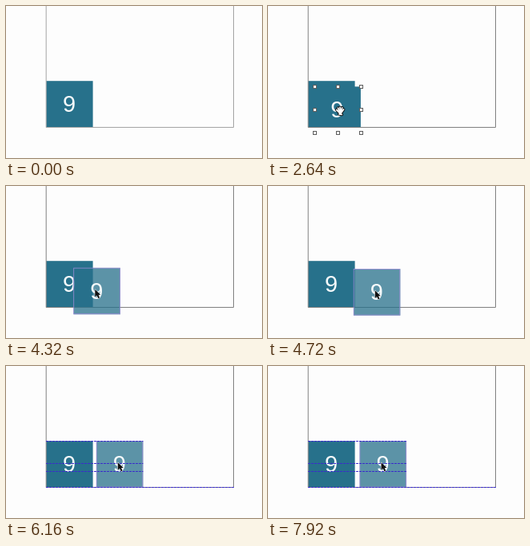
Recreate the animation shown at these times as an HTML page with a canvas. Size 320 by 191 pixels, loop 8 s.

```html
<!DOCTYPE html>
<html lang="en">
<head>
<meta charset="utf-8">
<title>Duplicate and drag</title>
<style>
html, body { margin: 0; width: 100%; height: 100%; overflow: hidden; background: #fdfdfd; }
canvas { display: block; width: 320px; height: 191px; }
</style>
</head>
<body>
<canvas id="stage"></canvas>
<script>
const LOOP = 8000, STEP = 80, SIZE = 58.4, LEFT = 50.2, TOP = 94.2;
const canvas = document.getElementById('stage');
const ctx = canvas.getContext('2d');
const dpr = window.devicePixelRatio || 1;
canvas.width = 320 * dpr;
canvas.height = 191 * dpr;

const ramp = (t, from, to) => Math.min(1, Math.max(0, (t - from) / (to - from)));

function handAt(t) {
  const enter = ramp(t, 400, 720), nudge = ramp(t, 3280, 3440);
  return [101 - 11 * enter - 4.5 * nudge, 172 - 39.5 * enter - nudge];
}

// Pull out, pull back, then small corrections
function copyAt(t) {
  const x = 57.5
    + 49.5 * ramp(t, 3840, 4720)
    + 37 * ramp(t, 4720, 5200)
    - 31 * ramp(t, 5360, 6160)
    - 8 * ramp(t, 6320, 6560)
    + 5 * ramp(t, 6720, 6960)
    + 5 * ramp(t, 7040, 7120)
    - 3.5 * ramp(t, 7200, 7360)
    + 3.2 * ramp(t, 7440, 7920);
  return [x, t < 4880 ? 101.3 + 3 * ramp(t, 3840, 4720) : TOP];
}

function line(color, dash, ...points) {
  ctx.strokeStyle = color;
  ctx.lineWidth = 1;
  ctx.setLineDash(dash);
  ctx.beginPath();
  points.forEach(([x, y]) => ctx.lineTo(x, y));
  ctx.stroke();
  ctx.setLineDash([]);
}

function tile(x, y, alpha = 1) {
  ctx.globalAlpha = alpha;
  ctx.fillStyle = '#27718b';
  ctx.fillRect(x, y, SIZE, SIZE);
  ctx.globalAlpha = 1;
  ctx.fillStyle = '#f6fafb';
  ctx.font = '29px "Liberation Sans", Arial, sans-serif';
  ctx.textAlign = 'center';
  ctx.fillText('9', x + 28.8, y + 39);
}

function handles(x, y) {
  ctx.fillStyle = '#fff';
  ctx.strokeStyle = '#5c5c5c';
  ctx.lineWidth = 1;
  for (let i = 0; i < 9; i++) {
    if (i === 4) continue;
    const hx = Math.round(x + (i % 3) * 29) - 1.5;
    const hy = Math.round(y + Math.floor(i / 3) * 29) - 1.5;
    ctx.fillRect(hx, hy, 4, 4);
    ctx.strokeRect(hx, hy, 4, 4);
  }
}

function hand(x, y) {
  const shape = new Path2D();
  for (let i = 0; i < 5; i++) {
    const angle = -2.75 + i * .56;
    shape.moveTo(x + .5, y + 3);
    shape.lineTo(x + .3 + 4.8 * Math.cos(angle), y + 5.2 * Math.sin(angle));
  }
  shape.moveTo(x - 1, y + 3.4);
  shape.lineTo(x + 2.2, y + 3.8);
  ctx.lineCap = ctx.lineJoin = 'round';
  for (const [color, width] of [['#111', 3.8], ['#fff', 1.8]]) {
    ctx.strokeStyle = color;
    ctx.lineWidth = width;
    ctx.stroke(shape);
  }
  ctx.lineCap = 'butt';
  ctx.lineJoin = 'miter';
}

function arrow(x, y) {
  const outline = new Path2D('M0 0V9.6L2.3 7.6 4 11.2 5.8 10.4 4.2 6.9H7Z');
  ctx.save();
  ctx.translate(x, y);
  ctx.strokeStyle = '#fff';
  ctx.lineWidth = 1;
  ctx.stroke(outline);
  ctx.fillStyle = '#111';
  ctx.fill(outline);
  ctx.restore();
}

function guides(t, right) {
  const blue = '#3a2ccb', dash = [3, 1];
  for (const y of [94.5, 122.5, 132.5]) line(blue, dash, [50, y], [right, y]);
  line(blue, dash, [50, 152.5], [285, 152.5]);
  if (t >= 5440 && t < 5680) line(blue, dash, [134.5, 0], [134.5, 152]);
}

function draw(t) {
  ctx.setTransform(dpr, 0, 0, dpr, 0, 0);
  ctx.fillStyle = '#fdfdfd';
  ctx.fillRect(0, 0, 320, 191);
  const dragging = t > 3840, copied = t >= 2640;
  const [x, y] = copied ? copyAt(t) : [LEFT, TOP];

  tile(LEFT, TOP);
  if (copied && !dragging) {
    ctx.save();
    ctx.beginPath();
    ctx.rect(50, 0, 235, 152.6);
    ctx.clip();
    tile(x, y);
    ctx.restore();
  }
  line(t < 880 ? '#a4a4a4' : '#808080', [], [50.2, 0], [50.2, 152.5], [284.5, 152.5], [284.5, 0]);

  if (dragging) {
    tile(x, y, .75);
    ctx.strokeStyle = '#9b8ad6';
    ctx.lineWidth = .8;
    ctx.strokeRect(x + .2, y + .2, SIZE - .8, SIZE - .8);
    if (t >= 4880) guides(t, x + SIZE);
    arrow(x + 26.8, y + 27);
  } else {
    if (t >= 880) handles(x, y);
    if (t >= 400) hand(...handAt(t));
  }
}

function tick() {
  const t = performance.now() % LOOP;
  draw(Math.floor(t / STEP) * STEP);
  requestAnimationFrame(tick);
}
tick();
</script>
</body>
</html>
```
